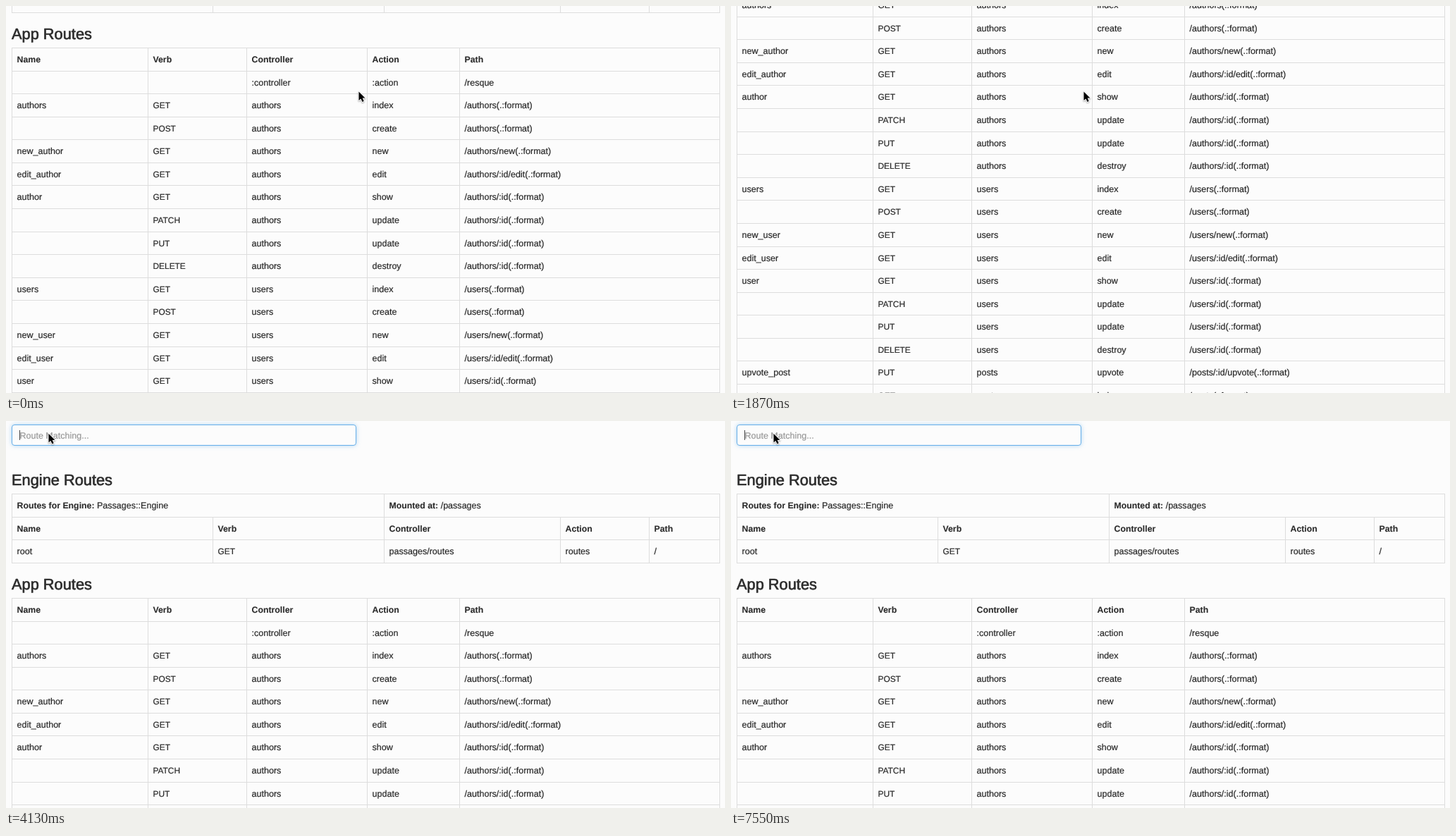
Write an HTML page with a canvas that moves like this. It is 1020 by 549 pixels and loops after 8 s.

```html
<!DOCTYPE html>
<html lang="en">
<head>
<meta charset="utf-8">
<title>Routes</title>
<style>
  html, body { margin: 0; width: 100%; height: 100%; overflow: hidden; background: #fcfcfc; }
  canvas { display: block; }
</style>
</head>
<body>
<canvas id="stage" width="1020" height="549"></canvas>
<script>
const ctx = document.getElementById('stage').getContext('2d');
const LOOP = 8000, ROW = 32.58;
const BG = '#fcfcfc', INK = '#2b2b2b', LINE = '#dddddd';
const FAMILY = '"Liberation Sans", Arial, sans-serif';

const HEAD = ['Name', 'Verb', 'Controller', 'Action', 'Path'];
const ENGINE_COLS = [8, 293, 536, 786, 912, 1012];
const APP_COLS = [8, 201, 341, 512, 643, 1012];
const MATCH_COLS = [8, 192, 289, 535, 659, 1012];

// The usual set of REST routes for one resource
function resource(name) {
  const one = name.slice(0, -1), id = `/${name}/:id`;
  return [
    [name, 'GET', 'index', `/${name}`],
    ['', 'POST', 'create', `/${name}`],
    ['new_' + one, 'GET', 'new', `/${name}/new`],
    ['edit_' + one, 'GET', 'edit', id + '/edit'],
    [one, 'GET', 'show', id],
    ['', 'PATCH', 'update', id],
    ['', 'PUT', 'update', id],
    ['', 'DELETE', 'destroy', id]
  ].map(([label, verb, action, path]) => [label, verb, name, action, path + '(.:format)']);
}

const ROOT = ['root', 'GET', 'passages/routes', 'routes', '/'];
const APP = [
  ['', '', ':controller', ':action', '/resque'],
  ...resource('authors'),
  ...resource('users'),
  ['upvote_post', 'PUT', 'posts', 'upvote', '/posts/:id/upvote(.:format)'],
  ...resource('posts')
];
const MATCHES = [ROOT, ...APP.filter(r => r[1] === 'GET')];

// Held steps: [time, value...]
const SCROLL = [
  [0, 195], [150, 206], [300, 209],
  [600, 226], [780, 285], [920, 317], [1080, 338], [1250, 349], [1430, 353],
  [1730, 337], [1880, 277], [2060, 204], [2230, 140], [2400, 89], [2540, 40],
  [2720, 2], [2870, 1], [3020, 0], [3470, 3]
];
const POINTER = [
  [0, 500, 121], [3320, 472, 113], [3470, 375, 86], [3620, 243, 52],
  [3780, 128, 27], [3950, 60, 17.5]
];
// [time, focused, typed text, highlighted match, caret shown]
const FIELD = [
  [0, false, '', '', false],
  [4130, true, '', '', true], [4730, true, '', '', false], [5180, true, '', '', true],
  [5330, true, 'G', 'G', true], [5470, true, 'GE', 'GE', true], [5620, true, 'GET', 'GET', true],
  [6370, true, 'GET', 'GET', false], [6810, true, 'GET', 'GET', true],
  [7110, true, 'GE', 'GE', true], [7260, true, 'G', 'G', true],
  [7400, true, '', 'G', true], [7550, true, '', '', true]
];

function at(steps, t) {
  let found = steps[0];
  for (const s of steps) if (s[0] <= t) found = s;
  return found.slice(1);
}

// Fills text with a fine outline to thicken it
function ink(text, x, y, color, weight) {
  ctx.fillStyle = ctx.strokeStyle = color;
  ctx.lineWidth = weight;
  ctx.fillText(text, x, y);
  ctx.strokeText(text, x, y);
}

// Draws text and returns the x where it ends
function write(text, x, y, bold, color = INK) {
  const size = bold ? 12.3 : /^[A-Z]+$/.test(text) ? 11.9 : 12.55;
  ctx.font = `${bold ? 'bold ' : ''}${size}px ${FAMILY}`;
  ink(text, x, y, color, bold ? 0.1 : 0.22);
  return x + ctx.measureText(text).width;
}

function heading(text, y) {
  ctx.font = `21.8px ${FAMILY}`;
  ink(text, 8, y, INK, 0.65);
}

// A cell is a list of [text, bold] runs
function tableRow(cols, top, cells) {
  const y = Math.round(top), bottom = Math.round(top + ROW);
  if (y > 549 || bottom < 0) return;
  ctx.fillStyle = LINE;
  ctx.fillRect(8, y, 1005, 1);
  ctx.fillRect(8, bottom, 1005, 1);
  for (const x of cols) ctx.fillRect(x, y, 1, bottom - y);
  cells.forEach((runs, i) => {
    let x = cols[i] + 7.5;
    for (const [text, bold] of runs) if (text) x = write(text, x, Math.round(top + 21), bold);
  });
}

const plain = row => row.map(text => [[text, false]]);
const strong = row => row.map(text => [[text, true]]);

function table(cols, top, rows) {
  [strong(HEAD), ...rows].forEach((cells, i) => tableRow(cols, top + i * ROW, cells));
}

function marked(row, match) {
  const cells = plain(row);
  cells[1] = [[match, true], [row[1].slice(match.length), false]];
  return cells;
}

function field(y, focused, text, caret) {
  if (y < -45) return;
  ctx.beginPath();
  ctx.roundRect(8.5, y + 0.5, 488, 29, 3.5);
  ctx.save();
  if (focused) {
    ctx.shadowColor = 'rgba(102,175,233,0.6)';
    ctx.shadowBlur = 6;
  }
  ctx.fillStyle = BG;
  ctx.fill();
  ctx.restore();
  ctx.lineWidth = 1;
  ctx.strokeStyle = focused ? '#66afe9' : '#cccccc';
  ctx.stroke();
  let end = 19.4;
  if (text) end = write(text, end, y + 20, false, '#555555');
  else write('Route Matching...', end, y + 20, false, '#999999');
  if (caret) {
    ctx.fillStyle = '#444444';
    ctx.fillRect(Math.floor(end), y + 8, 1, 14);
  }
}

const ARROW = [[0, 0], [0, 12.6], [2.9, 9.9], [5, 14.6], [7.2, 13.6], [5.2, 9.1], [9, 9]];

function pointer(x, y) {
  ctx.save();
  ctx.translate(x + 0.5, y + 0.5);
  ctx.beginPath();
  for (const p of ARROW) ctx.lineTo(...p);
  ctx.closePath();
  ctx.shadowColor = 'rgba(0,0,0,0.35)';
  ctx.shadowBlur = 2;
  ctx.shadowOffsetY = 1;
  ctx.strokeStyle = '#ffffff';
  ctx.lineWidth = 1.8;
  ctx.stroke();
  ctx.shadowColor = 'transparent';
  ctx.fillStyle = '#000000';
  ctx.fill();
  ctx.restore();
}

function fullPage(scroll) {
  const top = 106 - scroll;
  heading('Engine Routes', 94 - scroll);
  tableRow([8, 536, 1012], top, [
    [['Routes for Engine:', true], [' Passages::Engine', false]],
    [['Mounted at:', true], [' /passages', false]]
  ]);
  table(ENGINE_COLS, top + ROW, [plain(ROOT)]);
  heading('App Routes', 242 - scroll);
  table(APP_COLS, 254 - scroll, APP.map(plain));
}

function draw(t) {
  const [scroll] = at(SCROLL, t);
  const [focused, text, match, caret] = at(FIELD, t);
  ctx.textRendering = 'geometricPrecision';
  ctx.lineJoin = 'round';
  ctx.fillStyle = BG;
  ctx.fillRect(0, 0, 1020, 549);
  field(8 - scroll, focused, text, caret);
  if (match) table(MATCH_COLS, 56 - scroll, MATCHES.map(row => marked(row, match)));
  else fullPage(scroll);
  pointer(...at(POINTER, t));
}

let start;
function tick(now) {
  start ??= now;
  draw((now - start) % LOOP);
  requestAnimationFrame(tick);
}
draw(0);
requestAnimationFrame(tick);
</script>
</body>
</html>
```
